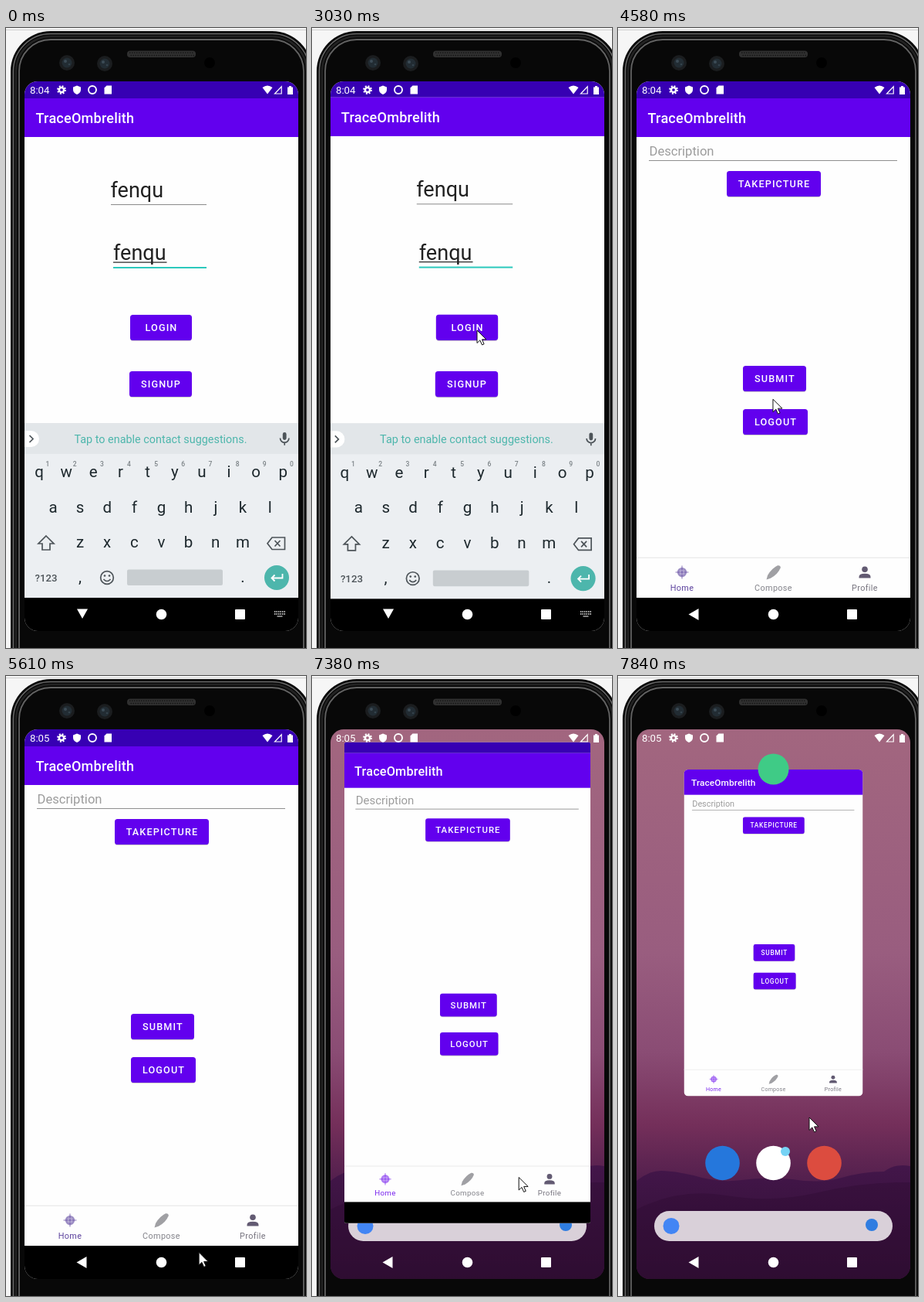
Animation, 389 px wide and 802 px high, one loop 8000 ms. Source, as an HTML page:

```html
<!DOCTYPE html>
<html lang="en">
<head>
<meta charset="utf-8">
<title>Phone login demo</title>
<style>
  html, body { margin: 0; width: 100%; height: 100%; overflow: hidden; background: #f6f6f6; }
  svg { display: block; width: 389px; height: 802px; font-family: Roboto, sans-serif; }
  .title { font-size: 18.07px; font-weight: 500; letter-spacing: .2px; fill: #fff; }
  .field { font-size: 27px; fill: #212121; }
  .btn { font-size: 12.65px; font-weight: 500; letter-spacing: 1.13px; fill: #fff; text-anchor: middle; }
  .tab { font-size: 10.84px; letter-spacing: .36px; text-anchor: middle; }
  .key { font-size: 20.5px; fill: #1d282d; text-anchor: middle; }
  .num { font-size: 8.5px; font-weight: 500; fill: #7b8286; text-anchor: middle; }
  .line { fill: none; stroke: #4d5459; stroke-width: 1.7; }
</style>
</head>
<body>
<svg id="stage" viewBox="0 0 389 802"></svg>
<script>
const LOOP = 8000, STEP = 1000 / 15;
const APP = 'TraceOmbrelith', USER = 'fenqu';
const PURPLE = '#6200ee', TEAL = '#4db6ac';

const rect = (x, y, w, h, fill, r = 0, more = '') =>
  `<rect x="${x}" y="${y}" width="${w}" height="${h}" rx="${r}" fill="${fill}" ${more}/>`;
const circle = (x, y, r, fill, more = '') =>
  `<circle cx="${x}" cy="${y}" r="${r}" fill="${fill}" ${more}/>`;
const text = (x, y, cls, s, more = '') =>
  `<text x="${x}" y="${y}" class="${cls}" ${more}>${s}</text>`;
const path = (d, more) => `<path d="${d}" ${more}/>`;
const group = (id, body) => `<g id="${id}">${body}</g>`;

const button = (x, y, w, label) =>
  rect(x, y + 1, w, 33, 'rgba(0,0,0,.2)', 4) +
  rect(x, y, w, 33, PURPLE, 3.6) +
  text(x + w / 2 + .5, y + 21.2, 'btn', label);

const appFrame = () =>
  rect(24, 69, 355, 711, '#fefefe') + rect(24, 69, 355, 22, '#3700b3') +
  rect(24, 91, 355, 50, PURPLE) + text(38.5, 123, 'title', APP) +
  rect(24, 737, 355, 43, '#000');

function phone() {
  const edge = (d, color, w) =>
    rect(6 + d, 4 + d, 391 - 2 * d, 900, 'none', 52 - d, `stroke="${color}" stroke-width="${w}"`);
  const lens = (x, y) => circle(x, y, 10, '#1b1d1f') + circle(x, y, 6.5, '#222c33') +
    circle(x - 2, y - 2, 2, '#3c4c57') + circle(x + 3, y + 2, 1.3, '#35434c');
  return rect(0, 2, 389, 1, '#cfcfcf') + rect(6, 4, 391, 900, '#080808', 52) +
    edge(3.5, '#686868', 1.6) + edge(7, '#222', 2.5) + edge(11, '#626262', 1.8) +
    lens(79, 45) + lens(128, 46) + circle(264, 45, 7, '#000') +
    rect(157, 29.5, 89, 8.5, '#303030', 4) +
    path('M160 32H244M161.500 35.500H244', 'stroke="#161616" stroke-width="1.500" stroke-dasharray="1.500 1.500"');
}

function launcher() {
  return rect(24, 69, 355, 711, 'url(#sky)') +
    path('M24 653Q40 640 56 640T98 646Q130 656 160 652T226 651Q262 657 290 649T345 641Q360 630 379 634V780H24Z', 'fill="url(#hill)"') +
    path('M24 690Q80 662 140 672T260 668T379 655V780H24Z', 'fill="#300c34" opacity=".45"') +
    circle(135.5, 630, 22.3, '#2577dc') + circle(201.5, 630, 22.3, '#fff') +
    circle(217, 615, 6, '#76d3f5') + circle(267.5, 630, 22.3, '#dc4c3f') +
    rect(47, 692, 309, 39, '#d9d0d9', 19.5) +
    circle(69, 711.5, 10.5, '#4285f4') + circle(329, 710, 8, '#2f7de1');
}

function login() {
  return appFrame() +
    text(135.5, 219, 'field', USER) + rect(136, 228, 124, 1, '#8b8b8b') +
    text(139, 300, 'field', USER) + rect(139, 302.5, 69.5, 1.2, '#212121') +
    rect(139, 309, 121, 2, '#2cc9bd') +
    rect(208, 271, 2, 37, '#2cc9bd', 0, 'id="caret"') +
    button(161, 371, 80, 'LOGIN') +
    `<g clip-path="url(#loginBox)">${circle(217, 393, 0, '#fff', 'id="tap"')}</g>` +
    button(160, 444, 81, 'SIGNUP');
}

function home() {
  const target = circle(83, 704, 5.6, 'var(--home)', 'opacity=".55"') +
    path('M83 695.500V712.500M74.500 704H91.500', 'stroke="var(--home)" stroke-width="1.600" opacity=".45"') +
    circle(83, 704, 5.6, 'none', 'stroke="var(--home)" stroke-width="1.4" opacity=".4"') +
    circle(83, 704, 2.4, 'none', 'stroke="#fff" opacity=".35"');
  return appFrame() +
    text(40.5, 165, '', 'Description', 'font-size="16.6" fill="#9c9c9c"') +
    rect(40, 171, 322, 1, '#8f8f8f') +
    button(141, 185, 122, 'TAKEPICTURE') +
    button(162, 437, 82, 'SUBMIT') + button(162, 493, 84, 'LOGOUT') +
    rect(24, 684, 355, 1, '#f6f6f6') + rect(24, 685, 355, 1, '#ececec') +
    target + text(83, 727.5, 'tab', 'Home', 'fill="var(--home)"') +
    path('M192.500 713.500l1.500-5.500q5-9 13-12.800q4-.400 3.700 3q-3 8-12.800 13.500z', 'fill="#a0a0a4"') +
    text(201.5, 727.5, 'tab', 'Compose', 'fill="#83838a"') +
    circle(320, 700.3, 3.8, '#625a72') +
    path('M312.500 711.500v-1.500q0-4.200 7.500-4.200q7.500 0 7.500 4.200v1.500z', 'fill="#625a72"') +
    text(320, 727.5, 'tab', 'Profile', 'fill="#77747f"');
}

function keyboard() {
  const row = (letters, x, y) =>
    [...letters].map((c, i) => text(x + 35.15 * i, y, 'key', c)).join('');
  const digits = [...'1234567890'].map((c, i) => text(54 + 35.15 * i, 566.5, 'num', c)).join('');
  return rect(24, 511, 355, 226, '#eceff2') + rect(24, 511, 355, 40, '#e2e6e9') +
    path('M24 521H32.500a10.500 10.500 0 0 1 0 21H24Z', 'fill="#fff"') +
    path('M30.500 527l4.500 4.500-4.500 4.500', 'class="line"') +
    text(200.5, 536.5, '', 'Tap to enable contact suggestions.', `font-size="14.4" text-anchor="middle" fill="${TEAL}"`) +
    rect(358.8, 523, 4.8, 10, '#4d5459', 2.4) +
    path('M355.500 530.500a5.700 5.700 0 0 0 11.400 0M361.200 536v3.800', 'class="line"') +
    row('qwertyuiop', 43, 581) + digits + row('asdfghjkl', 61, 626.5) + row('zxcvbnm', 96, 672) +
    path('M52 657l10 10h-5v8h-10v-8h-5z', 'class="line"') +
    path('M345 659h16.500v15.500h-16.500l-6-7.750zM348.500 663l7 7.500m0-7.500l-7 7.500', 'class="line"') +
    text(52, 715.5, '', '?123', 'font-size="13.2" font-weight="500" text-anchor="middle" fill="#4d5459"') +
    text(96, 717, 'key', ',') + text(307, 717, 'key', '.') +
    circle(131, 711, 8.3, 'none', 'class="line"') +
    circle(128, 708.5, 1.3, '#4d5459') + circle(134, 708.5, 1.3, '#4d5459') +
    path('M126.500 713q4.500 5 9 0', 'class="line"') +
    rect(157, 700.5, 124, 20.5, '#c8cdd0', 2) +
    circle(351, 711, 16, TEAL) +
    path('M358.500 706v5.500h-14m4-4l-4 4 4 4', 'fill="none" stroke="#fff" stroke-width="1.800"');
}

function systemBar() {
  return text(31, 85, '', '8:04', 'id="clock" font-size="13.2" fill="#fff"') +
    `<g fill="#fff">` +
    circle(72, 80, 3.1, 'none', 'stroke="#fff" stroke-width="2.5"') +
    circle(72, 80, 4.9, 'none', 'stroke="#fff" stroke-width="2" stroke-dasharray="1.95 1.9"') +
    path('M92 74.500l5 2v3.500c0 3-2.300 5-5 6-2.700-1-5-3-5-6v-3.500z', '') +
    circle(112, 80, 5, 'none', 'stroke="#fff" stroke-width="1.9"') +
    path('M130.500 74.500h6.500v11h-9.500v-8z', '') +
    path('M332.500 77Q339 72 345.500 77L339 85.500Z', '') +
    path('M348.500 85h8.700v-9.200z', 'stroke="#fff" stroke-width="1.2" fill="none"') +
    path('M365 76.500h2v-1.500h3v1.500h2v9.500h-7z', '') + `</g>`;
}

function navBar() {
  return rect(257, 737, 93, 43, '#fff', 21, 'id="press"') +
    group('navTyping',
      path('M92 751.500h14l-7 12.500z', 'fill="#fff"') +
      path('M348 755h14M348 758h14', 'stroke="#fff" stroke-width="1.5" stroke-dasharray="1.4 1.1"') +
      path('M351.500 761h7', 'stroke="#fff" stroke-width="1.2"')) +
    path('M91.500 758.500l13-7.500v15z', 'id="navBack" fill="#fff"') +
    circle(201.5, 758.5, 6.8, '#fff') + rect(297, 752, 13, 13, '#fff', 1);
}

document.getElementById('stage').innerHTML = `
  <defs>
    <linearGradient id="sky" gradientUnits="userSpaceOnUse" x1="0" y1="69" x2="0" y2="650">
      <stop offset="0" stop-color="#a2667f"/><stop offset=".5" stop-color="#995d7f"/>
      <stop offset=".72" stop-color="#8a4c74"/><stop offset=".88" stop-color="#742f5a"/>
      <stop offset="1" stop-color="#54204e"/>
    </linearGradient>
    <linearGradient id="hill" x1="0" y1="0" x2="0" y2="1">
      <stop offset="0" stop-color="#43164a"/><stop offset="1" stop-color="#2e0e30"/>
    </linearGradient>
    <clipPath id="screen">${rect(24, 69, 355, 711, '#000', 17)}</clipPath>
    <clipPath id="loginBox">${rect(161, 371, 80, 33, '#000', 3.6)}</clipPath>
    <clipPath id="cardBox">${rect(24, 69, 355, 711, '#000', 0, 'id="crop"')}</clipPath>
  </defs>` +
  phone() +
  `<g clip-path="url(#screen)">` + rect(24, 69, 355, 711, '#000') +
  group('launcher', launcher()) + group('login', login()) +
  group('home', `<g clip-path="url(#cardBox)">${home()}</g>`) +
  group('keys', keyboard()) + systemBar() + navBar() +
  circle(201.5, 120.5, 0, '#3fcb86', 'id="badge"') + `</g>` +
  path('M0 0V16.500l3.800-3.600 2.700 6 2.600-1.100-2.600-5.900H12z', 'id="pointer" fill="#fff" stroke="#111" stroke-width="1" stroke-linejoin="round"');

const $ = id => document.getElementById(id);
const set = (id, attrs) => { for (const k in attrs) $(id).setAttribute(k, attrs[k]); };
const show = (id, on) => set(id, { visibility: on ? 'visible' : 'hidden' });

// Linear value at time t from rows of [time, value, ...].
function at(t, rows, col = 1) {
  if (t <= rows[0][0]) return rows[0][col];
  for (let i = 1; i < rows.length; i++) {
    const a = rows[i - 1], b = rows[i];
    if (t < b[0]) return a[col] + (b[col] - a[col]) * (t - a[0]) / (b[0] - a[0]);
  }
  return rows[rows.length - 1][col];
}
const scaleAt = (x, y, s, toY = y) => `translate(${x} ${toY}) scale(${s}) translate(${-x} ${-y})`;

const POINTER = [
  [100, 358, 798], [200, 338, 700], [330, 290, 540], [500, 240, 430], [660, 217, 387],
  [860, 217, 387], [930, 199, 383], [1110, 199, 383], [1180, 214, 391],
  [4500, 214, 391], [4560, 202, 475], [4630, 180, 585], [4700, 156, 662], [4830, 128, 716],
  [5070, 128, 716], [5300, 165, 728], [5600, 262, 748], [5880, 301, 757.5],
  [6770, 301, 758], [7150, 287, 705], [7490, 257, 615], [7830, 248, 571]];
// Window change: quick start, long settle.
const OPEN = [[2995, 0], [3030, .08], [3062, .4], [3085, .71], [3153, .91], [3195, .95], [3395, 1]];
const SHRINK = [[7200, 0], [7300, .14], [7400, .38], [7490, .592], [7580, .595], [7640, .76], [7710, .9], [7830, 1]];

function draw(now) {
  const t = now % LOOP;
  const q = Math.max(0, 3030 + Math.floor((t - 3018) / STEP) * STEP);

  show('caret', (t >= 370 && t < 905) || (t >= 1440 && t < 1970) || (t >= 2500 && t < 3030));
  set('tap', {
    r: at(q, [[1130, 0], [1330, 62]]),
    opacity: at(q, [[1130, .25], [1300, .25], [1430, 0]])
  });

  // Login grows away under the home screen, then the keyboard sinks and fades.
  const open = at(q, OPEN), grown = 1 + .0475 * open;
  const sink = at(q, [[3255, 0], [3363, .74], [3410, 1]]);
  set('login', { transform: scaleAt(201.5, 424, grown) });
  set('keys', {
    transform: scaleAt(201.5, 424, grown, 424 + 23 * sink),
    opacity: 1 - sink
  });
  show('login', t < 3500);
  show('navTyping', t < 3260);
  show('navBack', t >= 3260);

  // Home window enters, later shrinks into a recents card.
  const p = at(q, SHRINK);
  set('home', {
    opacity: at(q, [[3045, 0], [3130, 1]]),
    transform: t < 6000 ? scaleAt(201.5, 424, .85 + .15 * open)
                        : scaleAt(201.5, 91, 1 - .3465 * p, 91 + 30 * p)
  });
  set('crop', { y: 69 + 22 * p, height: 711 - 65 * p, rx: 8 * p });
  const quiet = t > 3430 && t < 6790;
  $('home').style.setProperty('--home', quiet ? '#5d439e' : '#7a26ee');
  show('launcher', t >= 6780);
  set('badge', { r: at(q, [[7640, 0], [7830, 20]]) });

  $('clock').textContent = t < 5500 ? '8:04' : '8:05';
  const grow = at(q, [[6080, .3], [6430, 1]]);
  set('press', {
    opacity: at(q, [[6080, 0], [6480, .13], [6770, .13], [7080, 0]]),
    x: 303.5 - 46.5 * grow, width: 93 * grow
  });

  show('pointer', t >= 110);
  set('pointer', { transform: `translate(${at(q, POINTER)} ${at(q, POINTER, 2)})` });
}

const start = performance.now();
function tick() {
  draw(performance.now() - start);
  requestAnimationFrame(tick);
}
tick();
</script>
</body>
</html>
```
